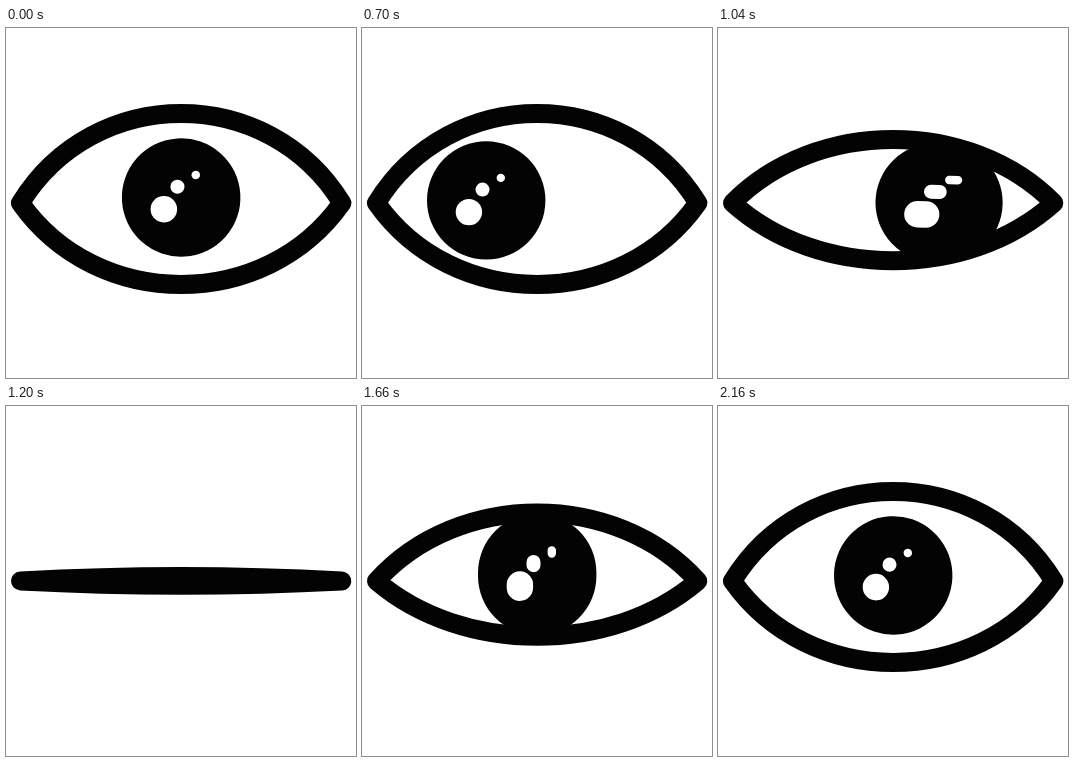
Recreate the animation shown at these times as an HTML page with a canvas. Size 350x350 px, loop 2500 ms.

```html
<!DOCTYPE html>
<html lang="en">
<head>
<meta charset="utf-8">
<title>Blinking eye</title>
<style>
  html, body { margin: 0; width: 100%; height: 100%; overflow: hidden; background: #fff; }
  canvas { display: block; width: 350px; height: 350px; }
</style>
</head>
<body>
<canvas id="stage" width="350" height="350"></canvas>
<script>
const ctx = document.getElementById('stage').getContext('2d');
const LOOP = 2500, STEP = 20, SHUTTER = 22;
const LEFT = 14.5, RIGHT = 335.8, MID = 175;
const INK = '#030303', PAPER = '#fff';

// Timing curve with end slopes of zero: control points (x1, 0) and (x2, 1).
function ease(x1, x2) {
  return x => {
    let lo = 0, hi = 1, s = 0.5;
    for (let i = 0; i < 24; i++) {
      s = (lo + hi) / 2;
      const at = 3 * s * (1 - s) * ((1 - s) * x1 + s * x2) + s * s * s;
      if (at < x) lo = s; else hi = s;
    }
    return s * s * (3 - 2 * s);
  };
}

// A track is a start value and moves of [begin, end, target, easing].
function track(start, moves) {
  return t => {
    let value = start;
    for (const [begin, end, target, curve] of moves) {
      if (t < begin) break;
      value = t >= end ? target : value + (target - value) * curve((t - begin) / (end - begin));
    }
    return value;
  };
}

const glance = ease(0.4, 0.6), sweep = ease(0.2, 0.41), shut = ease(0.93, 0.3),
      open = ease(0.38, 0.5), settle = ease(0.4, 0.5), cut = () => 1;

const lids = (rest, wide) => track(rest, [
  [700, 1340, 0, shut], [1380, 1940, wide, open], [1940, 2160, rest, settle]
]);
const upper = lids(89.5, 117.5);
const lower = lids(81.5, 95.5);

const pupilX = track(175.2, [
  [0, 300, 124.2, glance], [832, 1240, 258, sweep], [1360, 1361, 175.2, cut]
]);
const pupilY = track(169.5, [
  [0, 300, 172.4, glance], [832, 1240, 175.5, sweep],
  [1560, 1960, 132, open], [1960, 2160, 169.5, settle]
]);

function lidCurve(from, to, h) {
  const reach = Math.sign(to - from) * (107 - 0.375 * Math.abs(h));
  const y = MID + h * 4 / 3;
  ctx.bezierCurveTo(from + reach, y, to - reach, y, to, MID);
}

function traceLids(t) {
  ctx.beginPath();
  ctx.moveTo(LEFT, MID);
  lidCurve(LEFT, RIGHT, -upper(t));
  lidCurve(RIGHT, LEFT, lower(t));
  ctx.closePath();
}

// A disc smeared along its movement while the shutter is open.
function disc(t, dx, dy, r, color) {
  const a = Math.max(0, t - SHUTTER / 2), b = t + SHUTTER / 2;
  ctx.beginPath();
  ctx.moveTo(pupilX(a) + dx, pupilY(a) + dy);
  ctx.lineTo(pupilX(b) + dx + 0.01, pupilY(b) + dy);
  ctx.lineWidth = 2 * r;
  ctx.strokeStyle = color;
  ctx.stroke();
}

function draw(t) {
  ctx.fillStyle = PAPER;
  ctx.fillRect(0, 0, 350, 350);
  ctx.lineCap = ctx.lineJoin = 'round';

  ctx.save();
  traceLids(t);
  ctx.clip();
  disc(t, 0, 0, 59.2, INK);
  disc(t, -17.3, 11.7, 13.2, PAPER);
  disc(t, -3.7, -10.8, 7, PAPER);
  disc(t, 14.6, -22.5, 4.2, PAPER);
  ctx.restore();

  traceLids(t);
  ctx.lineWidth = 19;
  ctx.strokeStyle = INK;
  ctx.stroke();
}

const startTime = performance.now();
function tick() {
  const t = (performance.now() - startTime) % LOOP;
  draw(Math.floor(t / STEP) * STEP);
  requestAnimationFrame(tick);
}
tick();
</script>
</body>
</html>
```
